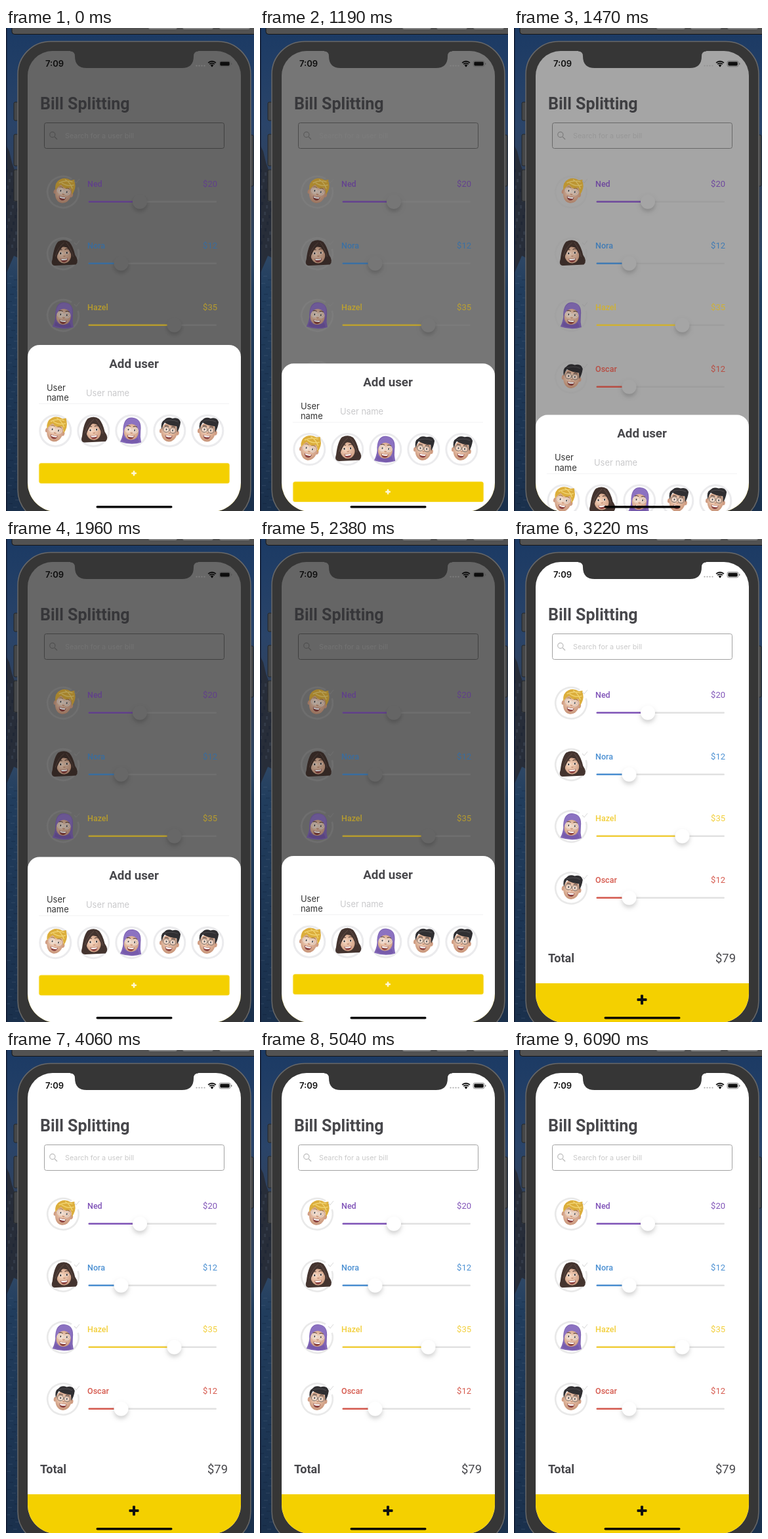
Write an HTML page with a canvas that moves like this. It is 378 px wide and 736 px high and loops after 6160 ms.

```html
<!DOCTYPE html>
<html lang="en">
<head>
<meta charset="utf-8">
<title>Bill Splitting</title>
<style>
  html, body { margin: 0; width: 100%; height: 100%; overflow: hidden; background: #1c3350; }
  canvas { display: block; width: 378px; height: 736px; }
</style>
</head>
<body>
<canvas id="stage"></canvas>
<script>
const W = 378, H = 736, LOOP = 6160;
const OPEN = 483, CLOSED = 740, VEIL = 0.25;
const YELLOW = '#f4d000', BEZEL = '#363636', INK = '#48484c';
const UI = 'Inter, sans-serif', ROBOTO = 'Roboto, sans-serif';

const canvas = document.getElementById('stage');
const ratio = window.devicePixelRatio || 1;
canvas.width = W * ratio;
canvas.height = H * ratio;
const c = canvas.getContext('2d');
let dim = 0;

const rows = [
  { name: 'Ned', amount: '$20', color: '#8054b8', thumb: 204, kind: 'blond' },
  { name: 'Nora', amount: '$12', color: '#4c90d2', thumb: 175.5, kind: 'long' },
  { name: 'Hazel', amount: '$35', color: '#f2cf3c', thumb: 256.5, kind: 'scarf' },
  { name: 'Oscar', amount: '$12', color: '#d65a4e', thumb: 175.5, kind: 'dark' }
];

// Sheet moves: start time, end time, start top, end top
const moves = [
  [1020, 1540, OPEN, 595],
  [1560, 1990, 595, OPEN],
  [2430, 2810, OPEN, CLOSED]
];

function sheetTop(t) {
  let y = OPEN;
  for (const [t0, t1, y0, y1] of moves) {
    if (t < t0) break;
    const u = Math.min(1, (t - t0) / (t1 - t0));
    y = y0 + (y1 - y0) * u * u * (3 - 2 * u);
  }
  return y;
}

// Grey that appears as `light` when bright and `dark` when dimmed, under the veil
function tone(light, dark) {
  const v = (light + (dark - light) * dim) / (1 - VEIL * dim);
  return `rgb(${v},${v},${v})`;
}

function box(x, y, w, h, r, fill, stroke, width = 1) {
  c.beginPath();
  c.roundRect(x, y, w, h, r);
  paint(fill, stroke, width);
}

function paint(fill, stroke, width) {
  if (fill) { c.fillStyle = fill; c.fill(); }
  if (stroke) { c.strokeStyle = stroke; c.lineWidth = width; c.stroke(); }
}

function oval(x, y, rx, ry, fill, stroke, width = 1) {
  c.beginPath();
  c.ellipse(x, y, rx, ry, 0, 0, Math.PI * 2);
  paint(fill, stroke, width);
}

function shape(d, fill, stroke, width = 1) {
  const p = new Path2D(d);
  if (fill) { c.fillStyle = fill; c.fill(p); }
  if (stroke) { c.strokeStyle = stroke; c.lineWidth = width; c.stroke(p); }
}

function text(s, x, y, font, color, align = 'left') {
  c.font = font;
  c.fillStyle = color;
  c.textAlign = align;
  c.fillText(s, x, y);
}

function plus(x, y, size, thick, color) {
  box(x - size / 2, y - thick / 2, size, thick, 1, color);
  box(x - thick / 2, y - size / 2, thick, size, 1, color);
}

function glasses(color) {
  for (const x of [-5.2, 5.2]) oval(x, 0, 4.6, 4.2, 'rgba(255,255,255,.2)', color, 1);
}

function face(x, y, kind) {
  const tilt = { blond: 0.22, long: -0.08, scarf: 0.12, dark: 0.14 }[kind];
  c.save();
  c.translate(x, y);
  c.rotate(tilt);
  if (kind === 'long') {
    shape('M-7-18Q3-22 10-16Q15-9 17 4Q23 14 17 19L-14 18Q-22 17-18 8Q-14-12-7-18Z', '#44342f');
  } else if (kind === 'scarf') {
    shape('M-13 0Q-14-19 0-19Q14-19 14 0Q14 9 17 17Q3 24-15 20Q-11 8-13 0Z', '#8166b6');
  } else {
    oval(-12.5, 3, 2.5, 3.5, '#cf9c82');
    oval(12.5, 3, 2.5, 3.5, '#cf9c82');
  }
  const skin = c.createRadialGradient(-3, 1, 2, 0, 2, 17);
  skin.addColorStop(0, '#f3d0b8');
  skin.addColorStop(1, '#c48f73');
  const slim = kind === 'scarf' || kind === 'long';
  oval(0, 3, slim ? 11 : 12.2, slim ? 12.5 : 15, skin);

  if (kind === 'blond') {
    shape('M-13 1Q-17-11-9-17Q-2-22 7-19L12-21L14-16Q18-8 13 3Q12-5 8-8Q2-2-6-9Q-10-6-13 1Z', '#dcae3c');
    shape('M-10-11Q-1-18 10-17M-6-12Q4-8 13-13M-2-18Q6-16 12-7', null, '#f3d878', 1.3);
  } else if (kind === 'dark') {
    shape('M-12 1Q-16-10-10-14Q-6-20 2-18Q11-22 15-14Q15-5 12 2L10-7Q0-6-9-10Q-11-6-12 1Z', '#302f32');
    shape('M-9-12Q1-17 11-14', null, '#4d4b4e', 1);
  } else if (kind === 'long') {
    shape('M-12 8Q-16-12-2-18Q13-17 13 9Q10-3 3-13Q-8-5-12 8Z', '#44342f');
    shape('M2-16Q-9-9-13 4M5-16Q12-6 14 7', null, '#66504a', 0.9);
  } else {
    shape('M-12 3Q-14-18 1-18Q14-18 12 3Q9-9 0-9Q-9-9-12 3Z', '#8c72c1');
    shape('M-11 12Q0 19 11 11L14 17Q1 22-12 18Z', '#775bab');
  }

  const brow = kind === 'blond' ? '#a87e42' : '#503b34';
  shape('M-8-5Q-5-7-2-5M2-5Q5-7 8-5', null, brow, 1);
  for (const ex of [-4.8, 4.8]) {
    oval(ex, 0, 2.2, 1.8, '#fff');
    oval(ex, 0, 1.3, 1.5, '#40342f');
  }
  shape('M-1 4Q0 6 2 4', null, '#b67d63', 1);
  shape('M-5.5 8Q0 9.5 5.5 8Q5 14 0 14Q-5 14-5.5 8Z', '#8b4240');
  shape('M-4.8 8.4Q0 9.6 4.8 8.4L4 10.6Q0 11.5-4 10.6Z', '#fff');
  if (kind !== 'long') glasses(kind === 'dark' ? '#77706b' : '#e4ded8');
  c.restore();
}

function backdrop() {
  const sea = c.createLinearGradient(0, 0, 0, H);
  [[0, '#1b3a64'], [0.2, '#2a4469'], [0.36, '#323f55'],
   [0.48, '#2c4665'], [0.54, '#213d5d'], [1, '#1a304c']]
    .forEach(([p, color]) => sea.addColorStop(p, color));
  c.fillStyle = sea;
  c.fillRect(0, 0, W, H);
  shape('M0 178L5 188L9 205L14 219L20 260V351L12 347L0 375Z', '#272d39');
  for (let i = 0; i < 90; i++) {
    const rock = i < 25;
    c.fillStyle = i % 2 ? 'rgba(105,125,150,.16)' : 'rgba(5,16,35,.18)';
    c.fillRect(i * 7 % 17, rock ? 215 + i * 5 : 240 + i * 5.5, rock ? 3 : 6, rock ? 5 : 1.5);
  }
  c.fillStyle = '#101a31';
  c.fillRect(0, 0, 1.5, H);
  box(9, -8, 380, 17.5, 4, '#525252', '#161616');
  for (const [x, w] of [[217, 44], [269, 47], [325, 47]]) box(x, -6, w, 8, 3, '#858585');
}

function phone() {
  for (const [x, y, h] of [[12, 113, 28], [12, 162, 48], [12, 216, 48], [370, 163, 78]])
    box(x, y, 7, h, 2, '#454749', '#252729');
  box(18, 20.5, 355, 733, 50, BEZEL, '#686868', 1.5);
}

function statusBar() {
  text('7:09', 60, 59, `600 13px ${UI}`, '#111');
  for (let i = 0; i < 4; i++) oval(290.5 + i * 4, 57.5, 1.1, 1.1, '#aaa');
  for (const r of [3.4, 6.2, 9]) {
    c.beginPath();
    c.arc(314, 59, r - 0.8, -Math.PI * 0.75, -Math.PI * 0.25);
    paint(null, '#111', 1.9);
  }
  oval(314, 58, 1.3, 1.3, '#111');
  box(325, 50.2, 17, 8.6, 2.5, null, '#777', 0.8);
  box(326.3, 51.5, 14.4, 6, 1.4, '#111');
  box(343, 53, 1.4, 3, 0.7, '#777');
}

function row({ name, amount, color, thumb, kind }, i) {
  const y = 250 + i * 94;
  c.beginPath();
  c.arc(87, y, 23.8, -0.3, Math.PI * 2 - 1);
  paint(null, tone(233, 110), 2.7);
  face(88, y - 1, kind);
  shape(`M104 ${y - 17}l3 3l5-6`, null, tone(222, 110), 1.1);
  text(name, 124, y - 8, `500 12.5px ${ROBOTO}`, color);
  text(amount, 322, y - 8, `13px ${ROBOTO}`, color, 'right');
  box(125.5, y + 13.5, 195.5, 2.6, 1.3, tone(225, 110));
  box(125.5, y + 13.5, thumb - 125.5, 2.6, 1.3, color);
  c.save();
  c.shadowColor = 'rgba(0,0,0,.18)';
  c.shadowBlur = 6 * ratio;
  c.shadowOffsetY = 4 * ratio;
  oval(thumb, y + 14.7, 11, 11, tone(255, 101));
  c.restore();
}

function bill() {
  c.fillStyle = tone(255, 101);
  c.fillRect(33, 35, 325, 705);
  statusBar();
  text('Bill Splitting', 52, 124, `bold 25px ${ROBOTO}`, INK);
  box(58.5, 144.5, 274, 39, 3, null, tone(162, 64));
  oval(70.8, 162.5, 4.1, 4.1, null, tone(187, 80), 1.2);
  shape('M74 165.7l4 4', null, tone(187, 80), 1.3);
  text('Search for a user bill', 90, 168, `10.8px ${UI}`, tone(202, 114));
  rows.forEach(row);
  text('Total', 52, 644.5, `bold 18px ${ROBOTO}`, INK);
  text('$79', 338, 644.5, `18.4px ${ROBOTO}`, INK, 'right');
  c.fillStyle = YELLOW;
  c.fillRect(33, 677, 325, 63);
  plus(195, 702, 15, 4, '#111');
}

function sheet(top) {
  c.save();
  c.translate(0, top);
  box(33, 0, 325, 280, [18, 18, 0, 0], '#fff');
  text('Add user', 195, 34.5, `bold 18.8px ${ROBOTO}`, INK, 'center');
  text('User', 62, 69.5, `12.9px ${UI}`, '#333');
  text('name', 62, 85, `12.9px ${UI}`, '#333');
  text('User name', 122, 77.5, `12.9px ${UI}`, '#c9c9cb');
  c.fillStyle = '#f2f2f3';
  c.fillRect(50, 89, 290, 1);
  ['blond', 'long', 'scarf', 'dark', 'dark'].forEach((kind, i) => {
    const x = 75.3 + i * 58;
    oval(x, 130.7, 23.5, 23.5, '#fff', '#ebebed', 3);
    face(x, 129.5, kind);
  });
  c.save();
  c.shadowColor = 'rgba(244,208,0,.5)';
  c.shadowBlur = 2 * ratio;
  box(50.5, 180.2, 290, 30.5, 3, YELLOW);
  c.restore();
  plus(195, 195.5, 8, 2.5, '#fff8d5');
  c.restore();
}

function draw(t) {
  const top = sheetTop(t);
  dim = (CLOSED - top) / (CLOSED - OPEN);
  c.setTransform(ratio, 0, 0, ratio, 0, 0);
  backdrop();
  phone();
  c.save();
  c.beginPath();
  c.roundRect(33, 35, 325, 702, [38, 38, 44, 44]);
  c.clip();
  bill();
  c.fillStyle = `rgba(0,0,0,${VEIL * dim})`;
  c.fillRect(33, 35, 325, 705);
  if (top < CLOSED) sheet(top);
  box(137.5, 728, 116, 3.6, 1.8, '#050505');
  c.restore();
  shape('M98 34H293V35.5Q286 35.5 286 43Q286 61 268 61H123Q105 61 105 43Q105 35.5 98 35.5Z', BEZEL);
}

const start = performance.now();
function tick() {
  draw((performance.now() - start) % LOOP);
  requestAnimationFrame(tick);
}
tick();
</script>
</body>
</html>
```
